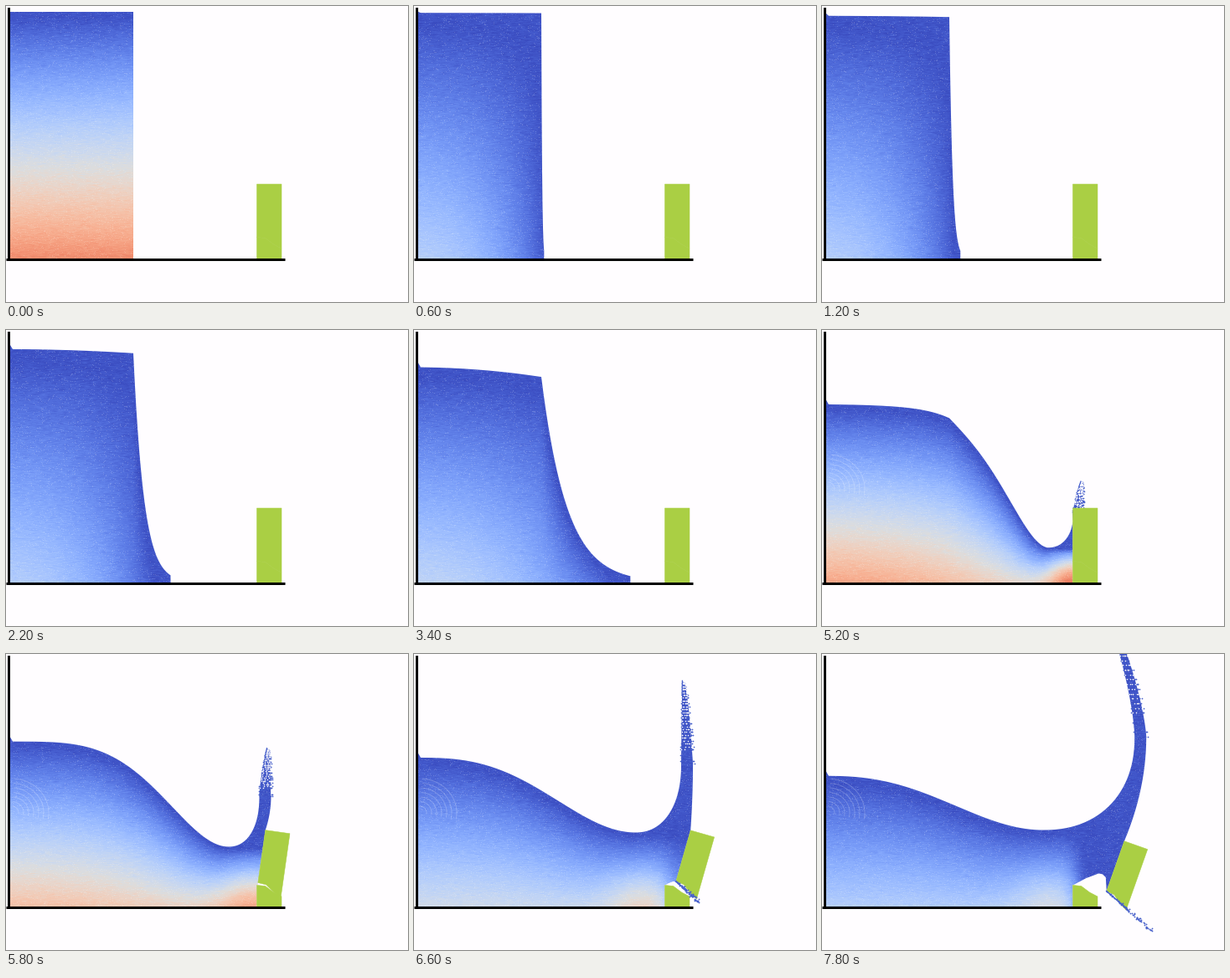
Animation of 480x354 px, one loop 8 s. Source, as a matplotlib script:

```python
import numpy as np
import matplotlib
import matplotlib.pyplot as plt
from matplotlib.animation import FuncAnimation
from matplotlib.path import Path

W, H, DPI = 480, 354, 100
PX = 72 / DPI
STEP, COUNT = 200, 40
LEFT, FLOOR, CORNER, WALL, WALL_TOP = 4, 302, 152, 299.5, 213
HIT, BREAK = 4.4, 5.4  # seconds
PAPER, GREEN, BLUE = "#fffdff", "#aacf44", "#465fcb"
COOLWARM = matplotlib.colormaps["coolwarm"]

CRACK = np.array([[0, 63.5], [10, 64.5], [20, 72], [29.5, 77]])
BLOCK = np.vstack([[[29.5, 0], [0, 0]], CRACK])
STUMP = np.vstack([CRACK, [[29.5, 90], [0, 90]]]) + (WALL, WALL_TOP)
ARCH = np.array([[42, -10], [38, -14], [33, -15], [17, -9], [0, 0]])

rng = np.random.default_rng(4)
grain = rng.normal(0, 1, (H, W))
streak = sum(np.roll(grain, k, axis=1) for k in range(5)) / 5
speck = rng.random((H, W)) > 0.95
spray = rng.random(200) ** 0.8, rng.uniform(-.1, 1.2, 200)
holes = 1 - 0.8 * rng.random(130) ** 1.3, rng.random(130)
drop_u, drop_j = rng.random(70), rng.normal(0, 1, (70, 2))
gx, gy = np.arange(W) + 0.5, (np.arange(H) + 0.5)[:, None]


def xy(x, y):
    return np.column_stack(np.broadcast_arrays(x, y))


def smooth(a, b, t):
    u = np.clip((t - a) / (b - a), 0, 1)
    return u * u * (3 - 2 * u)


def top_left(t):
    return 7 + 3.3 * t**2 / (1 + (t / 9.54) ** 4)


def collapse(x, t):
    """Column of water that slumps with an exponential front."""
    top, drop = top_left(t), min(t * t, 37)
    roof = top + drop * (x / CORNER) ** 2
    front = np.exp(-np.maximum(x - CORNER, 0) / (2.65 * t * t + 0.01))
    return np.where(x <= CORNER, roof, FLOOR - (FLOOR - top - drop) * front)


def wave(x, t, trough):
    power = 1.2 + 0.65 * np.exp((5.8 - t) / 0.6)
    low = 210.5 + 73 * np.exp(-((t - HIT) / 1.23) ** 2)
    u = (x - LEFT) / (trough - LEFT)
    return top_left(t) + (low - top_left(t)) * np.sin(np.pi / 2 * u**power) ** 2


def free_surface(t):
    if t < HIT:
        end = min(CORNER + 9.2 * t * t, WALL)
    else:
        end = 264 + 28 * np.exp((HIT - t) / 0.5)
    x = np.append(np.linspace(LEFT, CORNER, 60), np.linspace(CORNER, end, 80))
    y = collapse(x, t)
    if t >= HIT:
        w = smooth(HIT, 5.6, t)
        y = (1 - w) * y + w * wave(x, t, end)
    return xy(x, y)


def block_corners(t):
    s = max(0, t - BREAK)
    a = np.radians(20.5 * (1 - np.exp(-s / 0.8)))
    turn = np.array([[np.cos(a), np.sin(a)], [-np.sin(a), np.cos(a)]])
    return BLOCK @ turn + (WALL + 25.6 * s, WALL_TOP - 8 * s + 5.2 * s * s)


def jet(t, trough):
    """Bend up from the trough, then both sides of the jet up to its tip."""
    s = t - HIT
    tx, ty = trough
    rise = 47.5 * s**0.7
    sx, sy = 300 + 12.2 * max(0, t - 5.35) ** 2, ty - rise
    a = np.linspace(0, np.pi / 2, 30)
    bend = xy(tx + (sx - tx) * np.sin(a) ** 0.9, sy + rise * np.abs(np.cos(a)) ** 0.9)
    tip_x = sx + 9 - 12 * max(0, t - 5.8) ** 2
    tip_y = min(283 - 135 * s + 9.5 * s * s, sy)
    v = np.linspace(0, 1, 30)
    near = xy(sx + (tip_x - sx) * v**1.5, sy + (tip_y - sy) * v)
    far = near + xy(14 * min(1, s) * np.sqrt(1 - v), 0)
    return bend, near, far


def far_edge(t, far, corners):
    """From the tip down to the block, along it and over the gap."""
    cx, cy = corners[1]
    x, y = far[0]
    cy = max(cy, y)
    u = np.linspace(0, 1, 15)
    down = xy(cx + (x - cx) * (1 - u * u), y + (cy - y) * u)
    arch = ARCH * (corners[2, 0] - WALL) / 43 + STUMP[0]
    return np.vstack([far[::-1], down, corners[2:3], arch, [[WALL, FLOOR]]])


def pressure(t, surface):
    level = np.minimum(np.interp(gx, *surface.T), FLOOR - 2)
    depth = np.clip((gy - level) / (FLOOR - level), 0, 1)
    still = np.exp(-t / 0.15)
    bed = 0.36 + 0.42 * still + 0.36 * np.exp(-((t - 5.2) / 1.2) ** 2)
    taper = 1 - np.clip(gx / (160 + 2.1 * t**3), 0, 1) ** 2
    p = bed * depth * (still + (1 - still) * taper)

    # shock at the foot of the wall that spreads and fades
    s = max(0, t - HIT)
    size = min(5 + 20 * s, 33)
    amp = smooth(4.1, HIT, t) * (0.12 + 0.88 * np.exp(-s / 0.75))
    dx = gx - 299 + 25 * smooth(5.8, 6.8, t)
    p = p + amp * np.exp(-(dx**2 + (gy - 297) ** 2) / (2 * size**2)) * np.minimum(1, 6 * depth)
    drain = smooth(5.8, 7.4, t) / (1 + np.exp((304 - gx) / 6))
    return p * (1 - drain)


def paint(p, i):
    p = np.maximum(p, 0.02) + 0.022 * np.roll(streak, 2 * i, axis=1)
    rgb = COOLWARM(np.clip(p, 0, 1))[..., :3]
    return rgb + (1 - rgb) * 0.16 * np.roll(speck, i, axis=0)[..., None]


fig = plt.figure(figsize=(W / DPI, H / DPI), dpi=DPI, facecolor=PAPER)
ax = fig.add_axes([0, 0, 1, 1])
ax.axis("off")
water = ax.imshow(np.ones((H, W, 3)), extent=(0, W, H, 0), aspect="auto",
                  interpolation="nearest", zorder=1)
ax.set(xlim=(0, W), ylim=(H, 0))


def dots(color, size, z):
    return ax.plot([], [], "o", ms=size * PX, mew=0, color=color, zorder=z)[0]


def line(color, width, z):
    return ax.plot([], [], color=color, lw=width * PX, zorder=z)[0]


rings = [line("white", 0.8, 2) for _ in range(7)]
spray_dots, hole_dots, drops = dots(BLUE, 1.7, 3), dots(PAPER, 1.5, 4), dots(BLUE, 1.8, 7)
tip_line, trickle = line(BLUE, 1.2, 4), line(BLUE, 1.6, 6)
stump, = ax.fill(*STUMP.T, fc=GREEN, ec=GREEN, lw=0.5 * PX, zorder=5)
block, = ax.fill(*BLOCK.T, fc=GREEN, ec=GREEN, lw=0.5 * PX, zorder=5)
ax.plot([3, 3], [3, 303], color="black", lw=3 * PX, zorder=8)
ax.plot([0, 333], [303, 303], color="black", lw=3 * PX, zorder=8,
        solid_capstyle="butt")


def scatter(art, near, far, u, w):
    k = (u * (len(near) - 1)).astype(int)
    art.set_data(*(near[k] + (far[k] - near[k]) * w[:, None]).T)


def draw(i):
    t = i * STEP / 1000
    surface = free_surface(t)
    corners = block_corners(t)
    block.set_xy(corners)

    flying = t > HIT
    for art in (spray_dots, hole_dots, tip_line):
        art.set_visible(flying)
    if t >= HIT:
        bend, near, far = jet(t, surface[-1])
        rest = np.vstack([bend, near, far_edge(t, far, corners)])
        scatter(spray_dots, near, far, *spray)
        scatter(hole_dots, near, far, *holes)
        tip_line.set_data(*near[-6:].T)
    else:
        rest = [[surface[-1, 0], FLOOR]]

    climb = [[LEFT, surface[0, 1] - min(7, 3 * t)], [LEFT + 4, surface[0, 1]]]
    outline = np.vstack([climb, surface[2:], rest, [[LEFT, FLOOR]]])
    water.set_data(np.clip(paint(pressure(t, surface), i), 0, 1))
    water.set_clip_path(Path(outline), ax.transData)

    # water leaking under the broken block
    s = t - BREAK
    for art in (drops, trickle):
        art.set_visible(s > 0.5)
    reach = np.array([23, 20]) * s
    drops.set_data(*(corners[2] + drop_u[:, None] * reach
                     + drop_j * (0.4 + drop_u[:, None])).T)
    trickle.set_data(*(corners[2] + np.outer([0, 0.45], reach)).T)

    # faint rings by the left wall
    a = np.radians(np.linspace(-85, 10, 30))
    for k, ring in enumerate(rings):
        ring.set_data(7 + (8 + 6 * k) * np.cos(a), 190 + (8 + 5.5 * k) * np.sin(a))
        ring.set_alpha(0.25 * smooth(3.2, 4.2, t))
    return []


anim = FuncAnimation(fig, draw, frames=COUNT, interval=STEP, init_func=lambda: [],
                     repeat=True, repeat_delay=0, blit=False)
plt.show()
```
